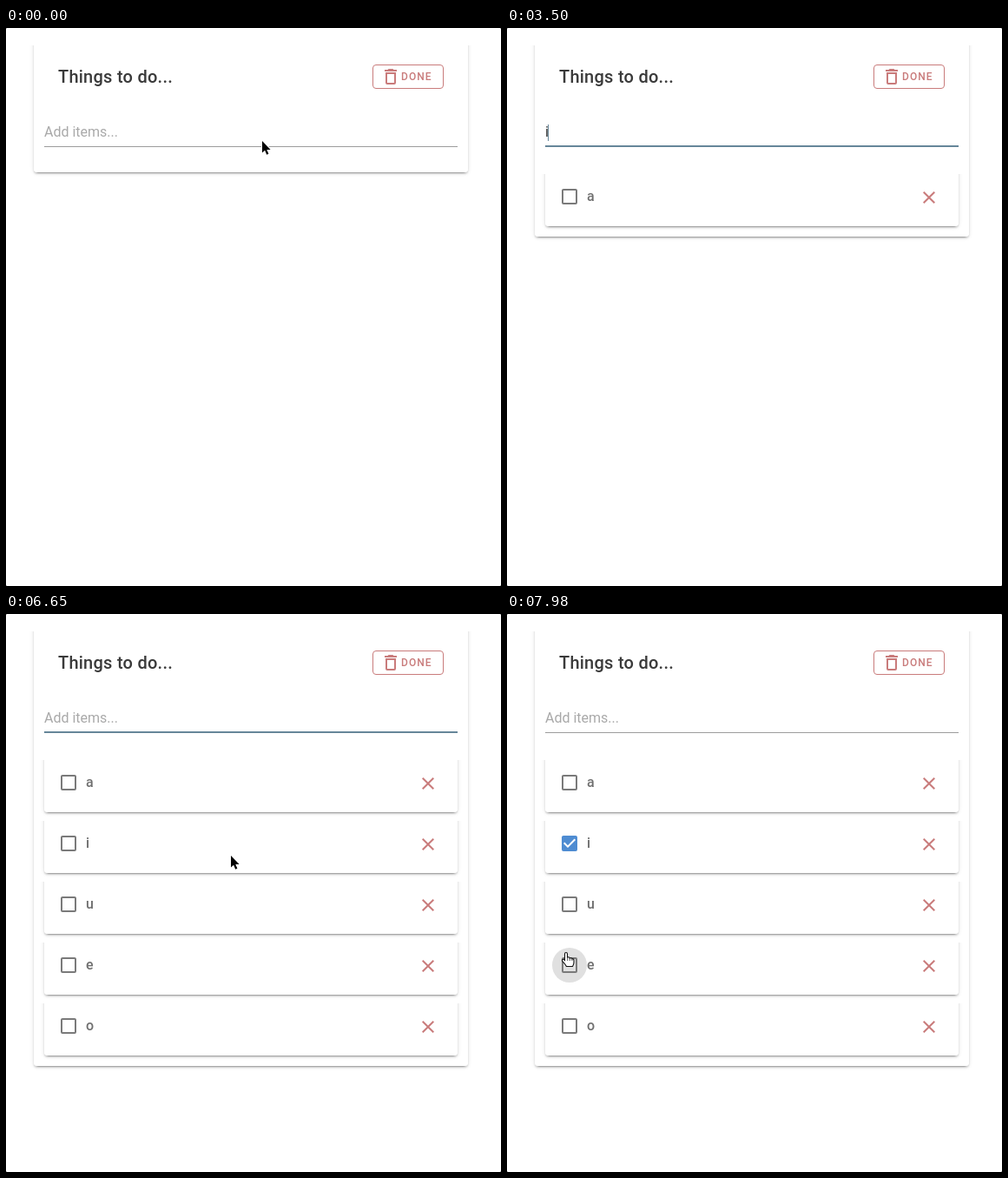
An HTML page with a canvas for the animation above (8 s loop, 570x642 px).

```html
<!DOCTYPE html>
<html lang="en">
<head>
<meta charset="utf-8">
<title>Things to do</title>
<style>
html, body { margin: 0; width: 570px; height: 642px; overflow: hidden; background: #fff; }
canvas { display: block; }
</style>
</head>
<body>
<canvas id="stage" width="570" height="642"></canvas>
<script>
const ctx = document.getElementById('stage').getContext('2d');
const LOOP = 8000, STEP = 70;
const RED = '#c97b7b', GREY = '#7a7a7a', BLUE = '#4e8cd2';

const ICONS = {
  trash: 'M6 19A2 2 0 0 0 8 21H16A2 2 0 0 0 18 19V7H6V19M8 9H16V19H8V9M15.5 4L14.5 3H9.5L8.5 4H5V6H19V4H15.5Z',
  close: 'M19 6.41L17.59 5L12 10.59L6.41 5L5 6.41L10.59 12L5 17.59L6.41 19L12 13.41L17.59 19L19 17.59L13.41 12Z',
  empty: 'M19 3H5C3.89 3 3 3.89 3 5V19A2 2 0 0 0 5 21H19A2 2 0 0 0 21 19V5C21 3.89 20.1 3 19 3M19 5V19H5V5H19Z',
  checked: 'M10 17L5 12L6.41 10.58L10 14.17L17.59 6.58L19 8M19 3H5C3.89 3 3 3.89 3 5V19A2 2 0 0 0 5 21H19A2 2 0 0 0 21 19V5C21 3.89 20.1 3 19 3Z',
  arrow: 'M0 0V13.6L3.1 10.8L5.2 15.7L7.4 14.8L5.3 10H9.6Z',
  hand: 'M-1.5 8.5V1Q-1.5 -.5 0 -.5T1.5 1V5Q4 4.3 4.3 6Q6.5 5.2 6.9 6.8Q9 6.4 9 8.5V11Q9 13 7.5 15.5H.5Q-1 12.5 -4.3 9.3Q-5 7 -3 7.2Z',
  knuckles: 'M1.7 5V9M4.3 6V9M6.9 7V9'
};
for (const name in ICONS) ICONS[name] = new Path2D(ICONS[name]);

const ITEMS = [['a', 3150], ['i', 3990], ['u', 4620], ['e', 5460], ['o', 6160]];
const TYPED = [[0, ''], [2800, 'a'], [3150, ''], [3500, 'i'], [3920, ''], [4200, 'u'],
  [4550, ''], [4900, 'e'], [5390, ''], [5740, 'o'], [6090, '']];
const CARET_OFF = [[2030, 2590], [3360, 3500], [6580, 7140]];
const FOCUS = 1540, BLUR = 7420, CHECK = 7490;
const POINTER = [[0, 295, 130], [70, 295, 130], [420, 304, 121], [6580, 304, 121],
  [6581, 260, 278], [6650, 259, 278], [7210, 60, 264], [7350, 53, 265],
  [7490, 53, 265], [7980, 68, 390]];

const within = (t, from, to) => t >= from && t < to;
const clamp = v => Math.min(1, Math.max(0, v));
const easeOut = v => 1 - (1 - clamp(v)) ** 3.25;
const rowY = i => 194 + 70 * i;

function text(str, x, y, size, weight, color, spacing = 0) {
  ctx.font = `${weight} ${size}px Roboto, sans-serif`;
  ctx.letterSpacing = spacing + 'px';
  ctx.fillStyle = color;
  ctx.fillText(str, x, y);
}

function icon(name, x, y, color) {
  ctx.save();
  ctx.translate(x, y);
  ctx.fillStyle = color;
  ctx.fill(ICONS[name], 'evenodd');
  ctx.restore();
}

function disc(x, y, r, color) {
  ctx.fillStyle = color;
  ctx.beginPath();
  ctx.arc(x, y, r, 0, 7);
  ctx.fill();
}

// White panel with a raised shadow that only shows below its top edge.
function panel(x, y, w, h) {
  ctx.save();
  ctx.beginPath();
  ctx.rect(x - 10, y + 8, w + 20, h + 10);
  ctx.clip();
  ctx.fillStyle = '#fff';
  for (const [dy, blur, inset, alpha] of [[1, 5, 0, .12], [2, 2, 0, .14], [3, 1, 2, .2], [0, 0, 0, 0]]) {
    ctx.shadowOffsetY = dy;
    ctx.shadowBlur = blur;
    ctx.shadowColor = `rgba(0,0,0,${alpha})`;
    ctx.beginPath();
    ctx.roundRect(x + inset, y + inset, w - 2 * inset, h - 2 * inset, 4);
    ctx.fill();
  }
  ctx.restore();
}

function pointerAt(t) {
  let i = 0;
  while (i < POINTER.length - 2 && t >= POINTER[i + 1][0]) i++;
  const [t0, x0, y0] = POINTER[i], [t1, x1, y1] = POINTER[i + 1];
  const k = clamp((t - t0) / (t1 - t0)), s = k * k * (3 - 2 * k);
  return { x: x0 + (x1 - x0) * s, y: y0 + (y1 - y0) * s };
}

function header() {
  text('Things to do...', 60, 63, 20, 500, '#3a3a3a', .25);
  ctx.strokeStyle = RED;
  ctx.lineWidth = 1;
  ctx.beginPath();
  ctx.roundRect(422.5, 42.5, 81, 27, 3.5);
  ctx.stroke();
  icon('trash', 431, 44, RED);
  text('DONE', 455, 60, 12, 500, RED, 1.07);
}

function input(t) {
  const value = TYPED.filter(([from]) => t >= from).pop()[1];
  if (value) text(value, 44, 125, 16, 400, '#303030');
  else text('Add items...', 44, 125, 16, 400, '#a9a9a9');

  const tint = clamp((t - FOCUS) / 210);
  const accent = `rgb(${48 + 54 * tint},${48 + 86 * tint},${48 + 105 * tint})`;
  const hover = within(t, 140, BLUR);
  ctx.fillStyle = hover ? '#858585' : '#9c9c9c';
  ctx.fillRect(44, 136, 476, 1);

  if (t >= FOCUS) {
    const grown = t < BLUR ? easeOut((t - 1507) / 300) : 1 - easeOut((t - BLUR) / 300);
    ctx.fillStyle = accent;
    ctx.fillRect(282 - 238 * grown, 135, 476 * grown, 2);
  }
  if (within(t, FOCUS, BLUR) && !CARET_OFF.some(([a, b]) => within(t, a, b))) {
    ctx.fillStyle = '#668699';
    const width = value ? ctx.measureText(value).width : 0;
    ctx.fillRect(44 + Math.floor(width), 111, 1, 19);
  }
}

function row(label, i, t, hovered) {
  const y = rowY(i), done = i === 1 && t >= CHECK;
  panel(44, y - 34, 476, 68);
  if (hovered) disc(72, y, 20, done ? 'rgba(78,140,210,.14)' : '#e0e0e0');
  icon(done ? 'checked' : 'empty', 60, y - 12, done ? BLUE : GREY);
  text(label, 92, y + 5, 16, 500, '#707070');
  icon('close', 474, y - 11, RED);
}

function ibeam() {
  const shape = new Path2D('M-3 -7.5Q0 -7.5 .5 -6Q1 -7.5 4 -7.5M.5 -6V7M-3 8.5Q0 8.5 .5 7Q1 8.5 4 8.5M-1.5 3.5H2.5');
  for (const [color, width] of [['#fff', 2.5], ['#222', 1]]) {
    ctx.strokeStyle = color;
    ctx.lineWidth = width;
    ctx.stroke(shape);
  }
}

function pointer(t, { x, y }, overBox) {
  if (within(t, 2870, 6650)) return;
  ctx.save();
  ctx.translate(Math.round(x), Math.round(y));
  if (within(t, FOCUS, 1680) || within(t, 7350, CHECK)) {
    ctx.strokeStyle = '#000';
    ctx.lineWidth = 3;
    ctx.beginPath();
    ctx.arc(0, 0, 15.2, 0, 7);
    ctx.stroke();
  }
  if (overBox) {
    ctx.fillStyle = '#fff';
    ctx.fill(ICONS.hand);
    ctx.strokeStyle = '#111';
    ctx.lineWidth = 1.1;
    ctx.stroke(ICONS.hand);
    ctx.lineWidth = .7;
    ctx.stroke(ICONS.knuckles);
  } else if (within(t, 140, 2870)) {
    ibeam();
  } else {
    ctx.strokeStyle = '#fff';
    ctx.lineWidth = 2;
    ctx.stroke(ICONS.arrow);
    ctx.fillStyle = '#000';
    ctx.fill(ICONS.arrow);
  }
  ctx.restore();
}

function draw(t) {
  ctx.fillStyle = '#fff';
  ctx.fillRect(0, 0, 570, 642);
  ctx.fillStyle = '#aaa';
  for (const x of [0, 569]) for (const y of [0, 641]) ctx.fillRect(x, y, 1, 1);

  const rows = ITEMS.filter(([, added]) => t >= added);
  const bottom = rows.length ? 170 + 70 * rows.length : 166;
  const spot = pointerAt(t);
  const hovers = i => t >= 6650 && Math.hypot(spot.x - 72, spot.y - rowY(i)) < 20;

  panel(32, 12, 500, bottom - 12);
  header();
  input(t);
  rows.forEach(([label], i) => row(label, i, t, hovers(i)));
  pointer(t, spot, rows.some((_, i) => hovers(i)));
}

function tick() {
  draw(Math.floor(performance.now() % LOOP / STEP) * STEP);
  requestAnimationFrame(tick);
}
tick();
</script>
</body>
</html>
```
